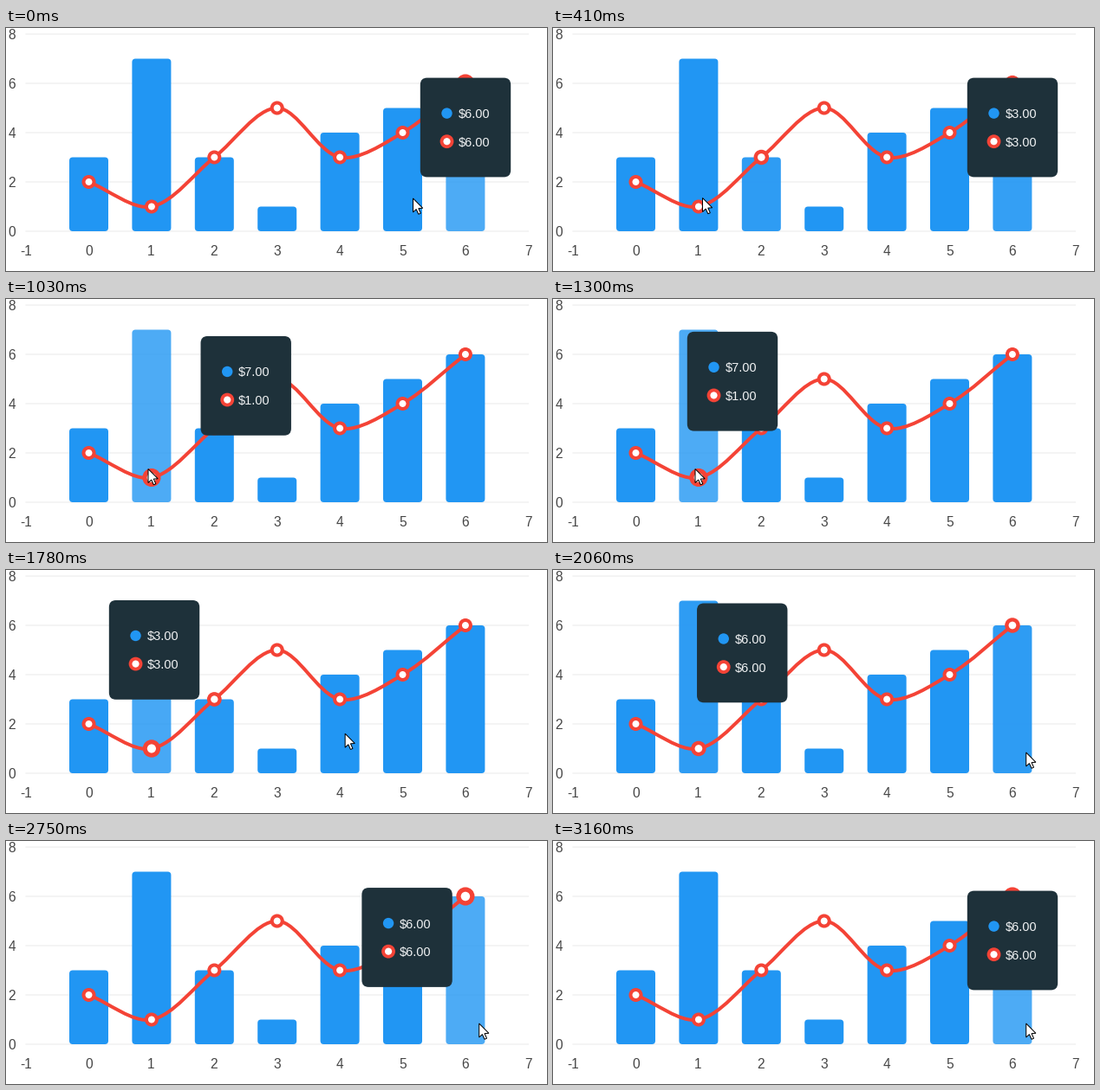
These frames come from a looping animation (624 by 281 pixels, 4.03 s). A matplotlib script:

```python
import numpy as np
import matplotlib.pyplot as plt
from matplotlib.animation import FuncAnimation
from matplotlib.patches import Circle, FancyBboxPatch, PathPatch, Polygon
from matplotlib.path import Path

W, H, DPI = 624, 281, 64
PT = 72 / DPI  # points per pixel
LOOP, TICK, STEP = 4030, 10, 68.4  # ms; the picture refreshes once per STEP
STEPS = LOOP / STEP

BLUE, RED, DARK = "#2196F3", "#F44336", "#1E313A"
BARS = [3, 7, 3, 1, 4, 5, 6]
LINE = [2, 1, 3, 5, 3, 4, 6]

TIP_RIGHT, TIP_LEFT = np.array([477.8, 57.6]), np.array([116.4, 34.8])
HAND_START = np.array([469.5, 197])
HAND_LEFT, HAND_RIGHT = np.array([164, 196.5]), np.array([545.7, 211])
FADE = 7        # steps for a full hover transition
LAG = 1.5       # steps between cursor and hover reaction


def px(i):
    return 95.5 + 72.4 * i


def py(v):
    return 235 - 28.5 * v


def quad_out(s):
    return 1 - (1 - s) ** 2


def sine_in_out(s):
    return (1 - np.cos(np.pi * s)) / 2


def glide(k, start, end, a, b, ease, bow=0):
    """Eased move from a to b, bowed vertically along the way."""
    f = ease(np.clip((k - start) / (end - start), 0, 1))
    return a + (b - a) * f + np.array([0, 4 * bow * f * (1 - f)])


def tip_at(k):
    if k < 24.9:
        return glide(k, 6.8, 24.9, TIP_RIGHT, TIP_LEFT, quad_out, 1.6)
    return glide(k, 24.9, 46, TIP_LEFT, TIP_RIGHT, sine_in_out, 1.2)


def cursor_at(k):
    if k < 24:
        return glide(k, 0, 6, HAND_START, HAND_LEFT, quad_out)
    return glide(k, 24, 29.5, HAND_LEFT, HAND_RIGHT, quad_out, -16.5)


def hovered(k):
    x = cursor_at((k - LAG) % STEPS)[0]
    return int(np.clip(round((x - px(0)) / 72.4), 0, 6))


def hover_weights():
    eye = np.eye(len(BARS))
    rows = [eye[hovered(0)]]
    for k in range(1, int(STEPS) + 1):
        change = eye[hovered(k)] - rows[-1]
        rows.append(rows[-1] + np.clip(change, -1 / FADE, 1 / FADE))
    return rows


def spline_path(pts, s=0.65):
    """Bezier curve with length-weighted control points."""
    p = np.vstack([pts[:1], pts, pts[-1:]])
    mid = (p[:-1] + p[1:]) / 2
    size = np.linalg.norm(np.diff(p, axis=0), axis=1)
    verts, codes = [p[1]], [Path.MOVETO]
    for i in range(1, len(p) - 2):
        k1 = size[i - 1] / (size[i - 1] + size[i])
        k2 = size[i] / (size[i] + size[i + 1])
        verts += [p[i] + s * (mid[i] - mid[i - 1]) * (1 - k1),
                  p[i + 1] - s * (mid[i + 1] - mid[i]) * k2, p[i + 1]]
        codes += [Path.CURVE4] * 3
    return Path(verts, codes)


fig = plt.figure(figsize=(W / DPI, H / DPI), dpi=DPI, facecolor="white")
ax = fig.add_axes([0, 0, 1, 1])
ax.set_xlim(0, W)
ax.set_ylim(H, 0)
ax.axis("off")


def rounded(x, y, w, h, r, color, z):
    return ax.add_patch(FancyBboxPatch(
        (x, y), w, h, boxstyle=f"round,pad=0,rounding_size={r}",
        fc=color, ec="none", lw=0, zorder=z))


def dot(x, y, r, z, fc="white", ec=RED, lw=4.0):
    return ax.add_patch(Circle((x, y), r, fc=fc, ec=ec, lw=lw * PT, zorder=z))


def label(x, y, s, size, color, ha="center", z=1):
    return ax.text(x, y, s, fontsize=size * PT, color=color, ha=ha,
                   va="center_baseline", family="Liberation Sans", zorder=z)


for v in range(0, 9, 2):
    ax.plot([23, 602.5], [py(v)] * 2, color="#EBEBEB", lw=PT, zorder=0,
            snap=False)
    label(7, py(v), str(v), 15.5, "#464646")
for i in range(-1, 8):
    label(px(i) - 0.3, 257, str(i), 15.5, "#464646")

bars = [rounded(px(i) - 22.5, py(v), 45, 28.5 * v, 4, BLUE, 2)
        for i, v in enumerate(BARS)]
points = np.array([(px(i), py(v)) for i, v in enumerate(LINE)])
ax.add_patch(PathPatch(spline_path(points), fc="none", ec=RED, lw=4 * PT,
                       zorder=3))
dots = [dot(x, y, 6, 4) for x, y in points]

tip = rounded(0, 0, 104.4, 114.8, 8, DARK, 6)
tip_marks = [dot(0, 0, 6.2, 7, fc=BLUE, ec="none", lw=0),
             dot(0, 0, 6, 7, lw=3.8)]
tip_texts = [label(0, 0, "", 14.5, "#F0F2F3", ha="left", z=7)
             for _ in tip_marks]

ARROW = np.array([(0, 0), (0, 16), (3.7, 12.6), (6.3, 18.3), (8.8, 17.2),
                  (6.3, 11.6), (11.2, 11.3)])
cursor = ax.add_patch(Polygon(ARROW, closed=True, fc="white", ec="black",
                              lw=PT, joinstyle="miter", zorder=9))

weights = hover_weights()


def draw(frame):
    k = int(frame * TICK / STEP)
    for bar, mark, w in zip(bars, dots, weights[k]):
        grow = 1 + 0.32 * w
        bar.set_alpha(1 - 0.2 * w)
        mark.set_radius(6 * grow)
        mark.set_linewidth(4 * PT * grow)

    x, y = tip_at(k)
    tip.set_x(x)
    tip.set_y(y)
    i = hovered(k)
    for row, v in enumerate((BARS[i], LINE[i])):
        row_y = y + 41 + 32.6 * row
        tip_marks[row].set_center((x + 30.7, row_y))
        tip_texts[row].set_position((x + 43.8, row_y))
        tip_texts[row].set_text(f"${v:.2f}")

    cursor.set_xy(ARROW + cursor_at(k))
    return [*bars, *dots, tip, *tip_marks, *tip_texts, cursor]


anim = FuncAnimation(fig, draw, frames=LOOP // TICK, interval=TICK,
                     repeat=True, repeat_delay=0, blit=False)
plt.show()
```
